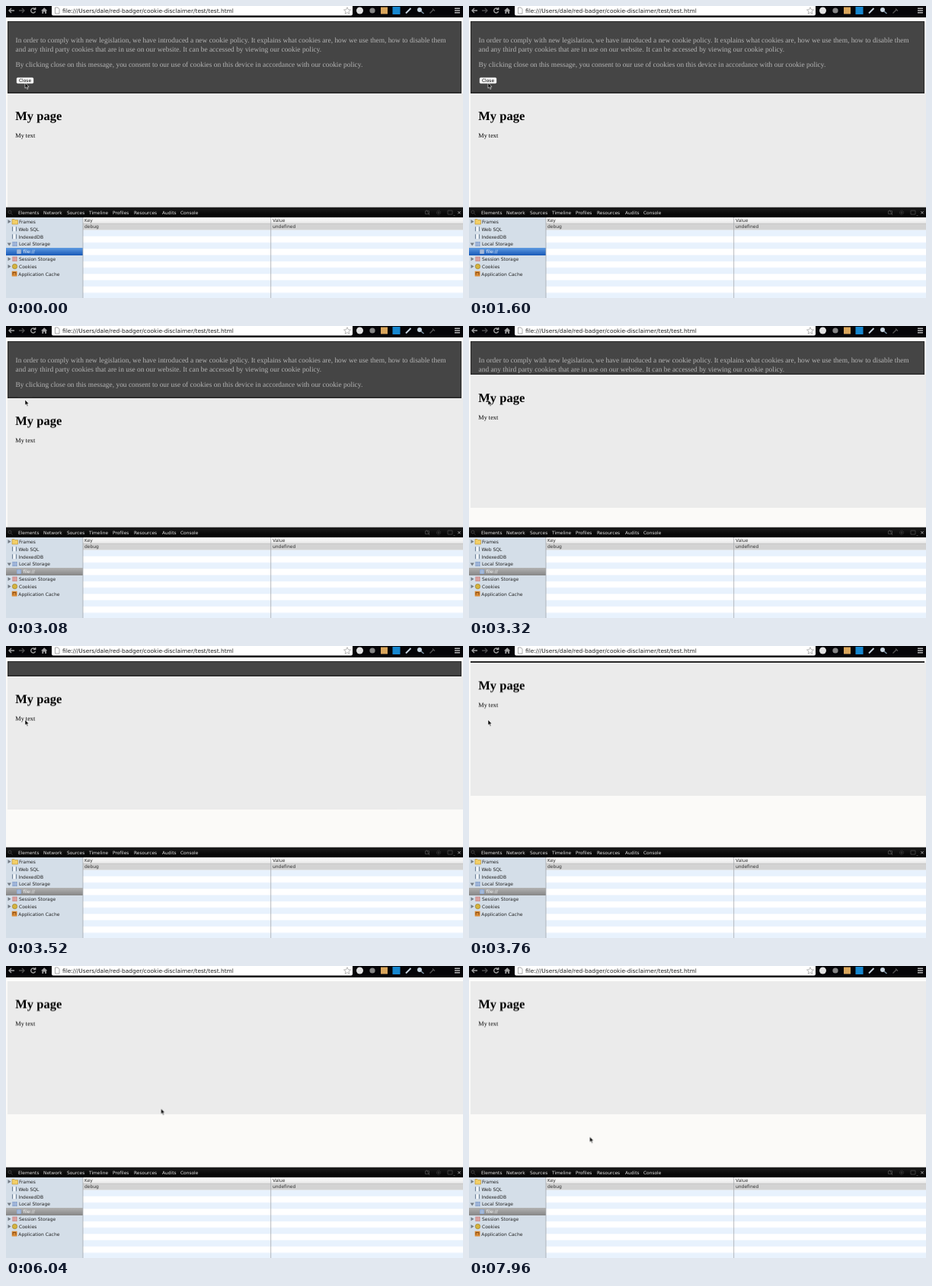
Animation, 600 px wide and 384 px high, one loop 8000 ms. Source, as an HTML page:

```html
<!DOCTYPE html>
<html lang="en">
<head>
<meta charset="utf-8">
<title>Cookie disclaimer</title>
<style>
html, body { margin: 0; width: 100%; height: 100%; overflow: hidden; background: #fbfaf8; }
svg { display: block; width: 600px; height: 384px; }
text { font-family: "DejaVu Sans", sans-serif; font-size: 6px; text-rendering: geometricPrecision; white-space: pre; }
.serif text { font-family: "Liberation Serif", serif; font-size: 8.28px; }
.serif .title { font-size: 16.5px; font-weight: bold; }
.serif .notice { font-size: 9.425px; fill: #b4b4b4; }

.page, .edge, .focus, .cursor { animation: 8s infinite; }
.page { animation-name: slide; }
.edge { animation-name: vanish; }
.focus { animation-name: blur; }
.cursor { animation-name: point; }

@keyframes slide {
  0%, 34.24% { transform: translateY(94.5px); animation-timing-function: cubic-bezier(.37, 0, .63, 1); }
  48.26%, 100% { transform: translateY(0); }
}
@keyframes vanish {
  0%, 48% { opacity: 1; }
  48.01%, 100% { opacity: 0; }
}
@keyframes blur {
  0%, 33% { opacity: 1; }
  33.01%, 100% { opacity: 0; }
}
@keyframes point {
  0%, 30% { transform: translate(25px, 101px); }
  32%, 62.5% { transform: translate(25px, 97px); animation-timing-function: ease-in-out; }
  74%, 80% { transform: translate(203.5px, 187.5px); animation-timing-function: ease-in-out; }
  87.5%, 91% { transform: translate(163px, 293px); animation-timing-function: ease-in-out; }
  97.5%, 100% { transform: translate(158.5px, 224.5px); }
}
</style>
</head>
<body>
<svg viewBox="0 0 600 384" xmlns="http://www.w3.org/2000/svg">
  <defs>
    <linearGradient id="active" x2="0" y2="1"><stop stop-color="#5f9be0"/><stop offset="1" stop-color="#1758b8"/></linearGradient>
    <linearGradient id="idle" x2="0" y2="1"><stop stop-color="#b2b2b2"/><stop offset="1" stop-color="#868686"/></linearGradient>
    <linearGradient id="header" x2="0" y2="1"><stop stop-color="#fff"/><stop offset="1" stop-color="#e6e6e6"/></linearGradient>
    <linearGradient id="bar" x2="0" y2="1"><stop stop-color="#1c1c1c"/><stop offset="1" stop-color="#000"/></linearGradient>
    <pattern id="rows" y="286.3" width="10" height="16.5" patternUnits="userSpaceOnUse">
      <rect width="10" height="16.5" fill="#fff"/><rect y="8.25" width="10" height="8.25" fill="#e8f2fd"/>
    </pattern>
    <path id="fold" d="M2.5-2.5 6.5 0 2.5 2.5z" fill="#737b84"/>
    <g id="table"><rect x="-3" y="-3" width="6" height="6" fill="currentColor"/><path d="M-3-1H3M-3 1H3M-1-3V3M1-3V3" stroke="#fff" stroke-width=".5" opacity=".7"/></g>
    <g id="database"><path d="M-2.5-3V3M2.5-3V3" stroke="#6e8299" stroke-width="1.1"/><rect x="-1.5" y="-3" width="3" height="6" fill="#f2f5f8"/></g>
  </defs>

  <!-- Web page -->
  <rect width="600" height="384" fill="#fbfaf8"/>
  <g class="serif">
    <rect x="2" y="20" width="598" height="95" fill="#ebebeb"/>
    <rect x="2.5" y="20.5" width="595" height="95" fill="#454545" stroke="#282828"/>
    <text class="notice" x="12.5" y="48">In order to comply with new legislation, we have introduced a new cookie policy. It explains what cookies are, how we use them, how to disable them</text>
    <text class="notice" x="12.5" y="59.5">and any third party cookies that are in use on our website. It can be accessed by viewing our cookie policy.</text>
    <text class="notice" x="12.5" y="79.8">By clicking close on this message, you consent to our use of cookies on this device in accordance with our cookie policy.</text>
    <rect x="13.5" y="93.8" width="23" height="8.4" rx="2" fill="#f8f8f8" stroke="#222" stroke-width=".5"/>
    <text x="17" y="100.2" style="font: 5.9px 'DejaVu Sans', sans-serif">Close</text>
    <g class="page">
      <rect x="2" y="20" width="598" height="175" fill="#ebebeb"/>
      <rect class="edge" x="2" y="18.5" width="596" height="1.5" fill="#282828"/>
      <text class="title" x="12.3" y="55.5">My page</text>
      <text x="12.3" y="78.6">My text</text>
    </g>
  </g>

  <!-- Browser toolbar -->
  <rect width="600" height="15" fill="#050508"/>
  <rect y="15" width="600" height="5" fill="#fdfdfc"/>
  <rect x="60" y="-3" width="395" height="15.5" rx="2" fill="#fff"/>
  <g fill="none" stroke="#a2a2a2" stroke-width="1.4">
    <path d="M11 6H4M7 3 4 6 7 9"/>
    <path d="M17 6h7M21 3l3 3-3 3" stroke="#4c4c4c"/>
    <path d="M38 4a3 3 0 1 0 .6 3M38.7 2v2.6H36"/>
  </g>
  <path d="M46 6.3 50.2 2.2 54.4 6.3H53V10H51.2V7.5H49.2V10H47.4V6.3z" fill="#a2a2a2"/>
  <path d="M64.5 2h3.5l2 2v6h-5.5z" fill="#fff" stroke="#888" stroke-width=".7"/>
  <text x="74" y="8.6" style="font-size:7.45px" fill="#222">file:///Users/dale/red-badger/cookie-disclaimer/test/test.html</text>
  <path d="M448 1.7 449.3 4.7 452.5 5 450 7.1 450.8 10.3 448 8.6 445.2 10.3 446 7.1 443.5 5 446.7 4.7z" fill="#fff" stroke="#999" stroke-width=".7"/>
  <circle cx="464.5" cy="6" r="4.5" fill="#e2e2e2"/>
  <circle cx="481" cy="6" r="3.6" fill="#858585"/>
  <rect x="492" y="1.5" width="9" height="9" fill="#d9a65c"/>
  <rect x="507.5" y="1" width="10" height="10" fill="#1687cf"/>
  <path d="M525 9.5 531.5 3" stroke="#c5d3df" stroke-width="2"/>
  <circle cx="543" cy="5" r="3" fill="#c6d4e0"/><path d="M545 7l3.5 3" stroke="#8298aa" stroke-width="1.5"/>
  <path d="M556.5 9.5 561 5M560 3.5l3 3" stroke="#555" stroke-width="1.3"/>
  <path d="M589 3.2h7M589 6h7M589 8.8h7" stroke="#b5b5b5" stroke-width="1.4"/>

  <!-- Developer tools -->
  <rect y="264.7" width="600" height="13.3" fill="url(#bar)"/>
  <g fill="none" stroke="#444" stroke-width=".9">
    <circle cx="5" cy="271" r="2"/><path d="M6.5 272.5 8.5 274.5"/>
    <path d="M550.5 269.5h5v4h-5zM552 268l4 7"/>
    <circle cx="568" cy="271.7" r="2.6" stroke-dasharray="1.2 .8"/><circle cx="568" cy="271.7" r="1"/>
    <path d="M580 269h6v5h-6zM587.5 275.5h2"/>
    <path d="M593.3 270l3.4 3.4M596.7 270l-3.4 3.4" stroke="#aaa"/>
  </g>
  <text y="273.8" fill="#e4e4e4" style="font-size:5.9px"><tspan x="16">Elements</tspan><tspan x="49">Network</tspan><tspan x="80">Sources</tspan><tspan x="109">Timeline</tspan><tspan x="140">Profiles</tspan><tspan x="168">Resources</tspan><tspan x="205">Audits</tspan><tspan x="229">Console</tspan></text>

  <rect y="278" width="101" height="106" fill="#d4dee8"/>
  <rect y="318" width="101" height="10" fill="url(#idle)"/>
  <rect class="focus" y="318" width="101" height="10" fill="url(#active)"/>
  <use href="#fold" y="283.5"/>
  <path d="M1.6 311.5h5.2l-2.6 4z" fill="#737b84"/>
  <use href="#fold" y="332.7"/>
  <use href="#fold" y="342.5"/>
  <path d="M8 280.5h3l1 1h3.5v5.5H8z" fill="#f3cf67" stroke="#b98e2c" stroke-width=".6"/>
  <use href="#database" x="11" y="293.3"/>
  <use href="#database" x="11" y="303.2"/>
  <use href="#table" x="11.5" y="313" color="#7594c6"/>
  <use href="#table" x="17" y="323" color="#7d9ac8"/>
  <use href="#table" x="11.5" y="332.7" color="#c87674"/>
  <circle cx="11.5" cy="342.5" r="3.2" fill="#d5b33d" stroke="#8f762a" stroke-width=".6"/>
  <rect x="7.7" y="348.7" width="6.8" height="6.8" fill="#d98a34"/><path d="M9 353.5v-3h4v3" fill="none" stroke="#7d4713" stroke-width=".9"/>
  <g fill="#222">
    <text x="17" y="285.8">Frames</text>
    <text x="16.5" y="295.6">Web SQL</text>
    <text x="16.5" y="305.5">IndexedDB</text>
    <text x="17" y="315.3">Local Storage</text>
    <text x="22.5" y="325.2" fill="#fff">file://</text>
    <text x="17" y="335">Session Storage</text>
    <text x="17" y="344.8">Cookies</text>
    <text x="16.3" y="354.6">Application Cache</text>
  </g>

  <rect x="101" y="278" width="499" height="106" fill="url(#rows)"/>
  <rect x="101" y="278" width="499" height="8.3" fill="url(#header)"/>
  <rect x="101" y="286" width="499" height="8.5" fill="#d3d3d3"/>
  <path d="M101 286.2H600" stroke="#b5b5b5" stroke-width=".5"/>
  <path d="M101 278V384M347.7 278V384" stroke="#a5a9ad" stroke-width=".8"/>
  <g fill="#333" style="font-size:5.8px">
    <text x="103" y="284.2">Key</text>
    <text x="350" y="284.2">Value</text>
    <text x="103" y="292.4">debug</text>
    <text x="350" y="292.4">undefined</text>
  </g>

  <path class="cursor" d="M0 0V7.2L1.6 5.7 2.8 8.4 4 7.9 2.8 5.3H5z" fill="#000" stroke="#fff" stroke-width=".6"/>
</svg>
</body>
</html>
```
